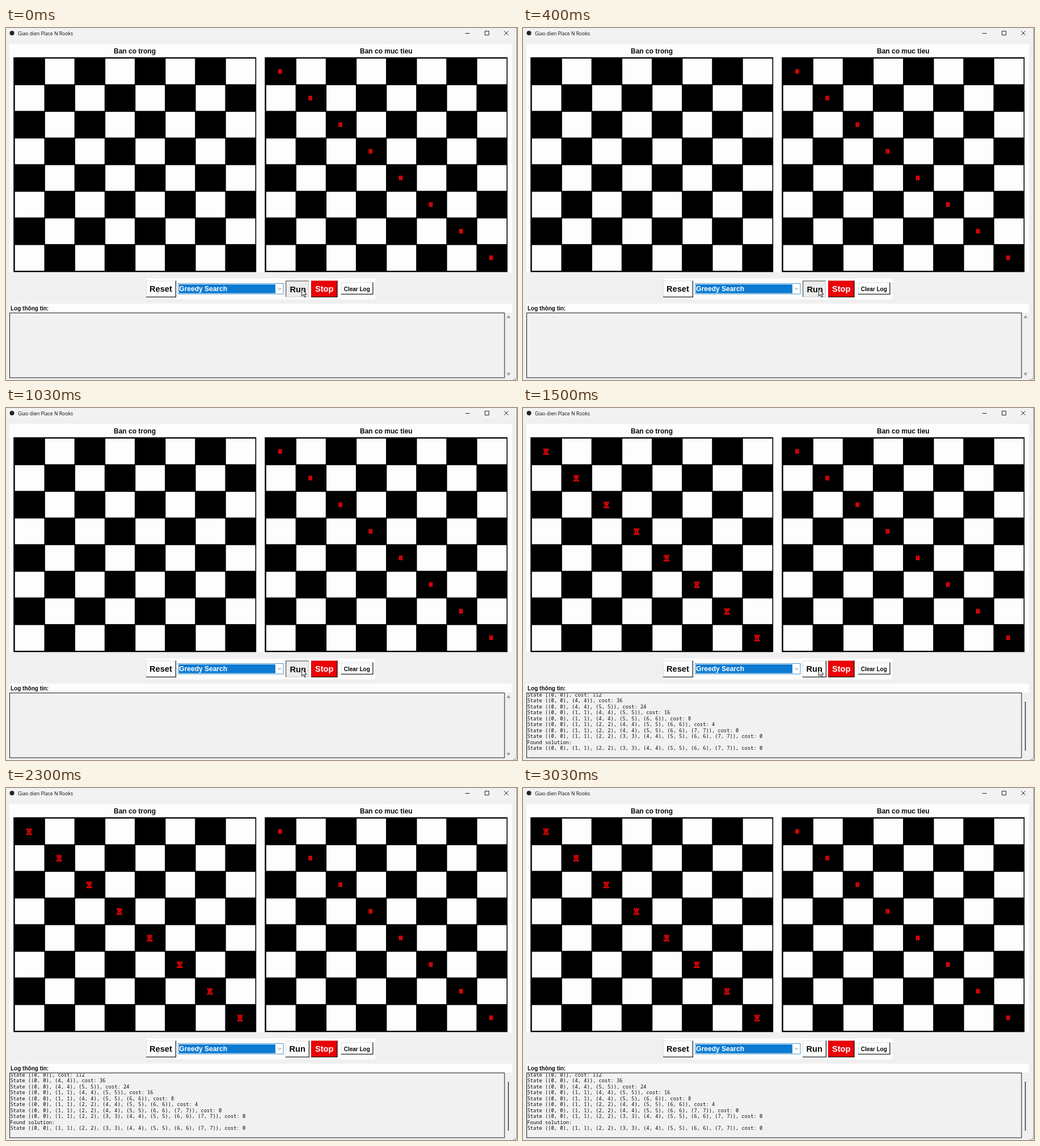
Write an HTML page that moves like this. It is 901 px wide and 622 px high and loops after 3130 ms.

```html
<!DOCTYPE html>
<html lang="vi">
<head>
<meta charset="utf-8">
<title>Place N Rooks</title>
<style>
html, body { margin: 0; width: 100%; height: 100%; overflow: hidden; background: #f0f0f0; }
svg { display: block; }
text { white-space: pre; font: bold 12px "Liberation Sans", Arial, sans-serif; fill: #0a0a0a; }
.big { font-size: 14.6px; }
.small { font-size: 10px; }
.title { font: 8.65px "Open Sans", "Noto Sans", sans-serif; }
.mono { font: 8.75px "Noto Sans Mono", "DejaVu Sans Mono", monospace; }
</style>
</head>
<body>
<svg id="stage" width="901" height="622" viewBox="0 0 901 622"></svg>
<script>
const LOOP = 3130, SOLVED = 1500, LIFT = 1530, ARRIVE = 1700, LEAVE = 2300;
const PAPER = '#fdfdfd', INK = '#000';
const stage = document.getElementById('stage');

function add(tag, attrs, parent = stage, content) {
  const el = document.createElementNS('http://www.w3.org/2000/svg', tag);
  for (const k in attrs) el.setAttribute(k, attrs[k]);
  if (content !== undefined) el.textContent = content;
  parent.appendChild(el);
  return el;
}
const rect = (x, y, width, height, fill, parent) => add('rect', { x, y, width, height, fill }, parent);
const line = (d, stroke, width = 1, parent) =>
  add('path', { d, stroke, 'stroke-width': width, fill: 'none' }, parent);
const label = (x, y, str, cls = '', parent, fill) => {
  const el = add('text', { x, y, class: cls }, parent, str);
  if (fill) el.style.fill = fill;
  return el;
};
const group = () => add('g', {});

function drawWindow() {
  rect(0, 0, 901, 622, '#f0f0f0');
  rect(0, 0, 901, 19, '#f2f2f2');
  line('M900.4 0V616Q900.4 621.6 894 621.6', '#8996a2', 1.1);
  add('circle', { cx: 10.5, cy: 9, r: 4, fill: '#222' });
  label(21, 12.6, 'Giao dien Place N Rooks', 'title');
  line('M810 9.5H817.5M844.5 5.5H851.5V12.5H844.5ZM878.3 5.3L885.7 12.7M885.7 5.3L878.3 12.7', '#222');
  rect(6, 28, 886, 403.5, PAPER);
}

function drawBoard(x, name, nameX) {
  label(nameX, 44.5, name);
  rect(x, 51.7, 428, 379.6, INK);
  for (let r = 0; r < 8; r++)
    for (let c = 0; c < 8; c++)
      if ((r + c) % 2) rect(x + 2.5 + 53.15 * c, 54 + 47.08 * r, 51.8, 45.4, PAPER);
}

function drawRooks(x, y, d, cut, parent) {
  for (let i = 0; i < 8; i++) {
    const g = add('g', { transform: `translate(${x + 53.15 * i} ${y + 47.05 * i})` }, parent);
    add('path', { d, fill: '#ee0508' }, g);
    line(cut, '#3c0000', 0.8, g);
  }
}

function button(x, y, w, h, fill, parent) {
  rect(x, y, w, h, fill, parent);
  line(`M${x + 0.5} ${y + h}V${y + 0.5}H${x + w}`, 'rgba(0,0,0,.12)', 1, parent);
  line(`M${x} ${y + h - 0.6}H${x + w - 0.6}V${y}`, '#222', 1.3, parent);
}

function drawControls() {
  rect(247, 442.5, 404, 37, PAPER);
  button(247, 446.5, 53, 29.5, PAPER);
  label(253, 466, 'Reset', 'big');
  add('rect', { x: 303.5, y: 451.5, width: 185.5, height: 18.5, fill: '#fff', stroke: '#4d96c9' });
  rect(305, 453, 170, 15.7, '#0a7ad2');
  label(305.3, 465, 'Greedy Search', '', stage, '#fff');
  line('M479.7 459.5L482.4 462.2L485.1 459.5', '#555', 0.9);
  button(538, 446.5, 46.5, 29.5, '#ea0206');
  label(545, 466, 'Stop', 'big', stage, '#fff');
  button(591, 449.5, 56.5, 21.5, PAPER);
  label(595.7, 464.5, 'Clear Log', 'small');
}

function drawRun() {
  const down = group(), up = group();
  rect(493, 446.5, 41, 29, '#ececec', down);
  line('M493.6 475V447H533.5', '#444', 1.1, down);
  line('M494 475H533.5V447', '#ccc', 1, down);
  label(500.5, 466.8, 'Run', 'big', down);
  button(493, 446.5, 42, 29.5, PAPER, up);
  label(499.5, 466, 'Run', 'big', up);
  return [down, up];
}

function drawLog() {
  rect(6, 487, 886, 16, PAPER);
  label(8, 499, 'Log thông tin:', 'small');
  add('rect', { x: 6.5, y: 503.5, width: 872.5, height: 114.5, fill: '#f1f1f1', stroke: '#1a1a22' });
  const idle = group(), full = group();
  add('path', { d: 'M882.5 512.5L886 507.5L889.5 512.5ZM882.5 609.5L886 614.5L889.5 609.5Z', fill: '#999' }, idle);
  line('M885.7 519V605.5', '#33373c', 1.5, full);
  const clip = add('clipPath', { id: 'pane' });
  rect(7, 504.5, 871, 113, INK, clip);
  const body = add('g', { 'clip-path': 'url(#pane)' }, full);
  const state = (rows, cost) =>
    `State (${[...rows].map(n => `(${n}, ${n})`).join(', ')}), cost: ${cost}`;
  [
    'State [(0, 0)], cost: 112',
    state('04', 36), state('045', 24), state('0145', 16), state('01456', 8),
    state('012456', 4), state('0124567', 0), state('01234567', 0),
    'Found solution:', state('01234567', 0)
  ].forEach((str, i) => label(7.6, 509.6 + 10.52 * i, str, 'mono', body));
  return [idle, full];
}

drawWindow();
drawBoard(13.2, 'Ban co trong', 190);
drawBoard(456.3, 'Ban co muc tieu', 624);
drawRooks(483.3, 76.7, 'M-3.2-4H3.2V4H-3.2Z', 'M-1.6-1.7H1.6M-1.5 1.7H1.5', stage);
const placed = group();
drawRooks(40.6, 77,
  'M-4.7-5.8H-2.8V-4.6H-1V-5.8H1V-4.6H2.8V-5.8H4.7V-2.7L3.2-1.7V2.2L4 3.3V3.8H5.2V5.8H-5.2V3.8H-4V3.3L-3.2 2.2V-1.7L-4.7-2.7Z',
  'M-2.8-2.5H2.8M-1.4-.6V2H1.4V-.6M-3 3.6H3', placed);
drawControls();
const [runDown, runUp] = drawRun();
const [logIdle, logFull] = drawLog();
const pointer = add('path', {
  d: 'M0 0V12.3L2.8 9.7L4.8 14.4L6.7 13.6L4.7 9H8.4Z',
  fill: '#fff', stroke: INK, 'stroke-width': 0.9, 'stroke-linejoin': 'round'
});

const show = (el, on) => el.setAttribute('visibility', on ? 'visible' : 'hidden');

function render(t) {
  const solved = t >= SOLVED;
  show(placed, solved);
  show(runUp, solved);
  show(runDown, !solved);
  show(logFull, solved);
  show(logIdle, !solved);
  const p = Math.min(1, Math.max(0, (t - LIFT) / (ARRIVE - LIFT)));
  const ease = p * p * (3 - 2 * p);
  pointer.setAttribute('transform', `translate(521.6 ${461.3 - 47 * ease})`);
  show(pointer, t < LEAVE);
}

const start = performance.now();
function tick() {
  render((performance.now() - start) % LOOP);
  requestAnimationFrame(tick);
}
tick();
</script>
</body>
</html>
```
